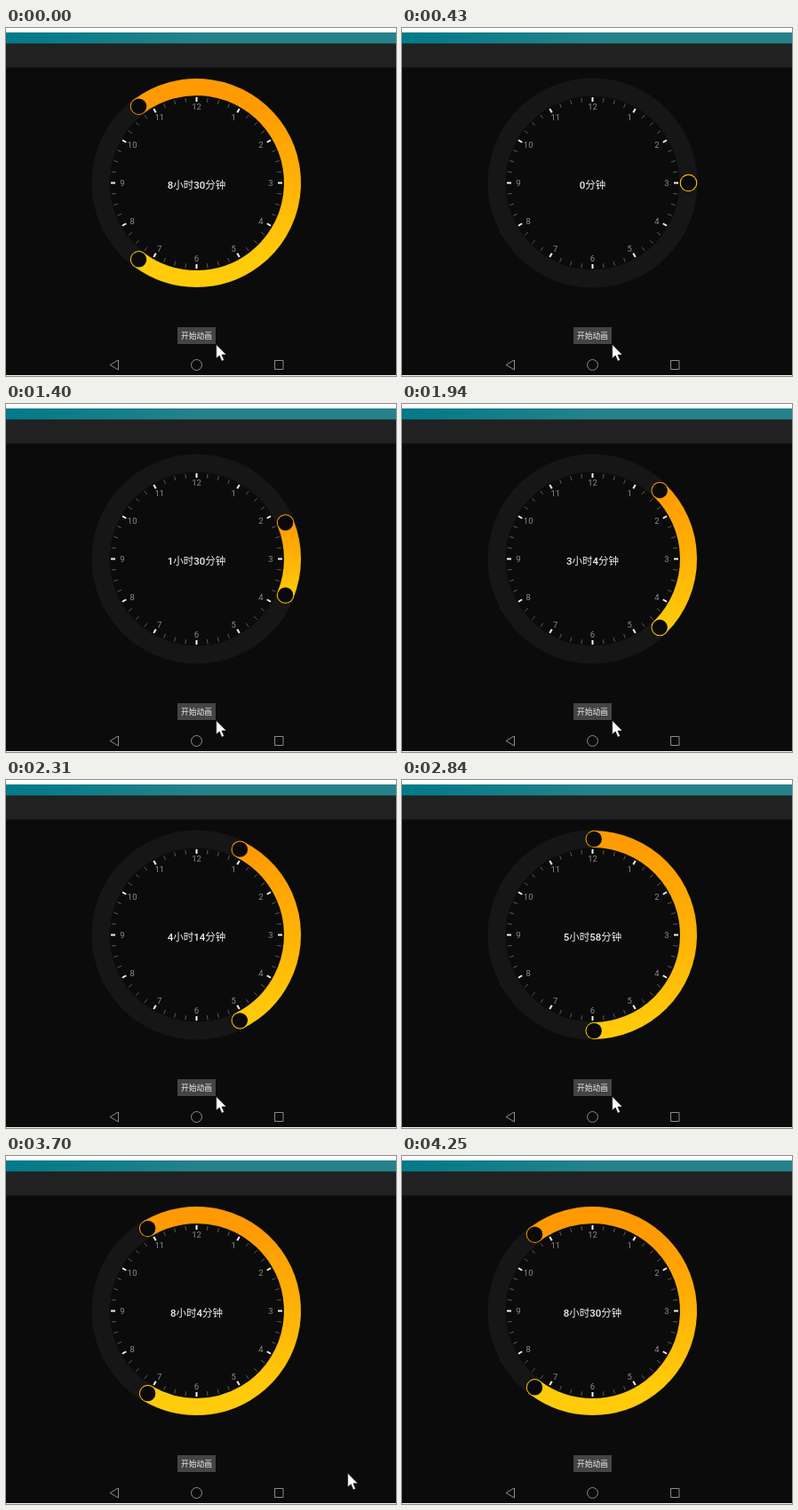
Animation, 439 px wide and 392 px high, one loop 5500 ms. Source, as an HTML page with a canvas:

```html
<!DOCTYPE html>
<html lang="zh">
<head>
<meta charset="utf-8">
<style>
  html, body { margin: 0; width: 100%; height: 100%; overflow: hidden; background: #0b0b0b; }
  canvas { display: block; }
</style>
</head>
<body>
<canvas id="stage" width="439" height="392"></canvas>
<script>
const ctx = document.getElementById('stage').getContext('2d');
const LOOP = 5500, TAU = Math.PI * 2;
const PRESS = 280, RESET = 430, REST = 4250;             // ms
const BEGIN = 306, DURATION = 3949, FULL = 510;          // animator, ms and minutes
const FIRST_TICK = 344.2, TICK = 87.9;                   // screen refresh, ms
const CX = 214.5, CY = 174.5, RING = 108;
const FONT = 'Roboto, "Noto Sans CJK SC", "Noto Sans CJK", sans-serif';
const ORANGE = '#ff9a02', YELLOW = '#ffcb0a', DARK = '#0b0b0b';

const ramp = (t, from, to) => Math.min(1, Math.max(0, (t - from) / (to - from)));

// Accelerate-decelerate easing, sampled once per screen refresh.
function minutesAt(t) {
  if (t < RESET || t >= REST) return FULL;
  const shown = FIRST_TICK + TICK * Math.floor((t - FIRST_TICK) / TICK);
  return FULL * (1 - Math.cos(Math.PI * ramp(shown, BEGIN, BEGIN + DURATION))) / 2;
}

function rect(x, y, w, h, fill) {
  ctx.fillStyle = fill;
  ctx.fillRect(x, y, w, h);
}

function disc(x, y, r, fill) {
  ctx.fillStyle = fill;
  ctx.beginPath();
  ctx.arc(x, y, r, 0, TAU);
  ctx.fill();
}

function arc(from, to, width, style) {
  ctx.strokeStyle = style;
  ctx.lineWidth = width;
  ctx.beginPath();
  ctx.arc(CX, CY, RING, from, to);
  ctx.stroke();
}

function label(str, x, y, size, fill, weight = 400) {
  ctx.font = `${weight} ${size}px ${FONT}`;
  ctx.textAlign = 'center';
  ctx.fillStyle = fill;
  ctx.fillText(str, x, y + size * .36);
}

function verticalBlend(y0, y1, from, to) {
  const blend = ctx.createLinearGradient(0, y0, 0, y1);
  blend.addColorStop(0, from);
  blend.addColorStop(1, to);
  return blend;
}

function drawBars() {
  rect(0, 0, 439, 392, DARK);
  rect(0, 0, 439, 5, '#fff');
  rect(0, 17, 439, 27, '#212121');
  rect(0, 44, 439, 1, '#161616');
  rect(0, 391, 439, 1, '#f4f4f4');
  const teal = ctx.createLinearGradient(0, 0, 220, 0);
  teal.addColorStop(0, '#017a89');
  teal.addColorStop(1, '#25828b');
  rect(0, 5, 439, 12.4, teal);

  ctx.strokeStyle = '#8c8c8c';
  ctx.lineWidth = 1;
  ctx.beginPath();
  ctx.moveTo(117, 379.5);
  ctx.lineTo(126.5, 374);
  ctx.lineTo(126.5, 385);
  ctx.closePath();
  ctx.moveTo(220.5, 379.5);
  ctx.arc(214.5, 379.5, 6, 0, TAU);
  ctx.rect(302.5, 374.5, 9.5, 10);
  ctx.stroke();
}

function drawDial() {
  arc(0, TAU, 20, '#161616');
  for (let i = 0; i < 48; i++) {
    const hour = i % 4 === 0, a = i * TAU / 48;
    const x = Math.sin(a), y = -Math.cos(a);
    ctx.strokeStyle = hour ? '#f2f2f2' : '#5a5a5a';
    ctx.lineWidth = hour ? 2 : 1;
    ctx.beginPath();
    ctx.moveTo(CX + x * 96.5, CY + y * 96.5);
    ctx.lineTo(CX + x * 91.5, CY + y * 91.5);
    ctx.stroke();
    if (hour) label(i / 4 || 12, CX + x * 83.5, CY + y * 85.5, 9.5, '#8c8c8c');
  }
}

function drawTimer(minutes) {
  // The ring trails the label by two minutes; four minutes make one degree.
  const half = Math.max(0, minutes - 2) / 4 * Math.PI / 180;
  const x = CX + RING * Math.cos(half), dy = RING * Math.sin(half);
  arc(-half, half, 19, verticalBlend(CY - dy, CY + dy, ORANGE, YELLOW));
  for (const [y, color] of [[CY - dy, ORANGE], [CY + dy, YELLOW]]) {
    disc(x, y, 9.7, color);
    disc(x, y, 8.7, '#090909');
  }
  const total = Math.floor(minutes), h = Math.floor(total / 60);
  label((h ? h + '小时' : '') + total % 60 + '分钟', CX, 177, 11.5, '#f0f0f0', 500);
}

function drawButton(pressed) {
  rect(193, 337, 43, 19, pressed ? '#666' : '#444');
  label('开始动画', 214.5, 347, 8.75, '#f0f0f0', 500);
}

// The pointer slides right, then sinks off the stage.
function drawPointer(t) {
  if (t >= 4130) return;
  ctx.save();
  ctx.translate(236.7 + 148 * ramp(t, 3480, 3690), 356.6 + 20 * ramp(t, 3690, 3980));
  ctx.fill(new Path2D('M0 0'));
  const arrow = new Path2D('M0 0V15.5L3.6 12.4L6.2 18.6L8.8 17.5L6.2 11.5H11.3Z');
  ctx.fillStyle = '#fff';
  ctx.fill(arrow);
  ctx.strokeStyle = '#111';
  ctx.lineWidth = .6;
  ctx.stroke(arrow);
  ctx.restore();
}

function frame() {
  const t = performance.now() % LOOP;
  drawBars();
  drawDial();
  drawTimer(minutesAt(t));
  drawButton(t >= PRESS && t < RESET);
  drawPointer(t);
  requestAnimationFrame(frame);
}
frame();
</script>
</body>
</html>
```
